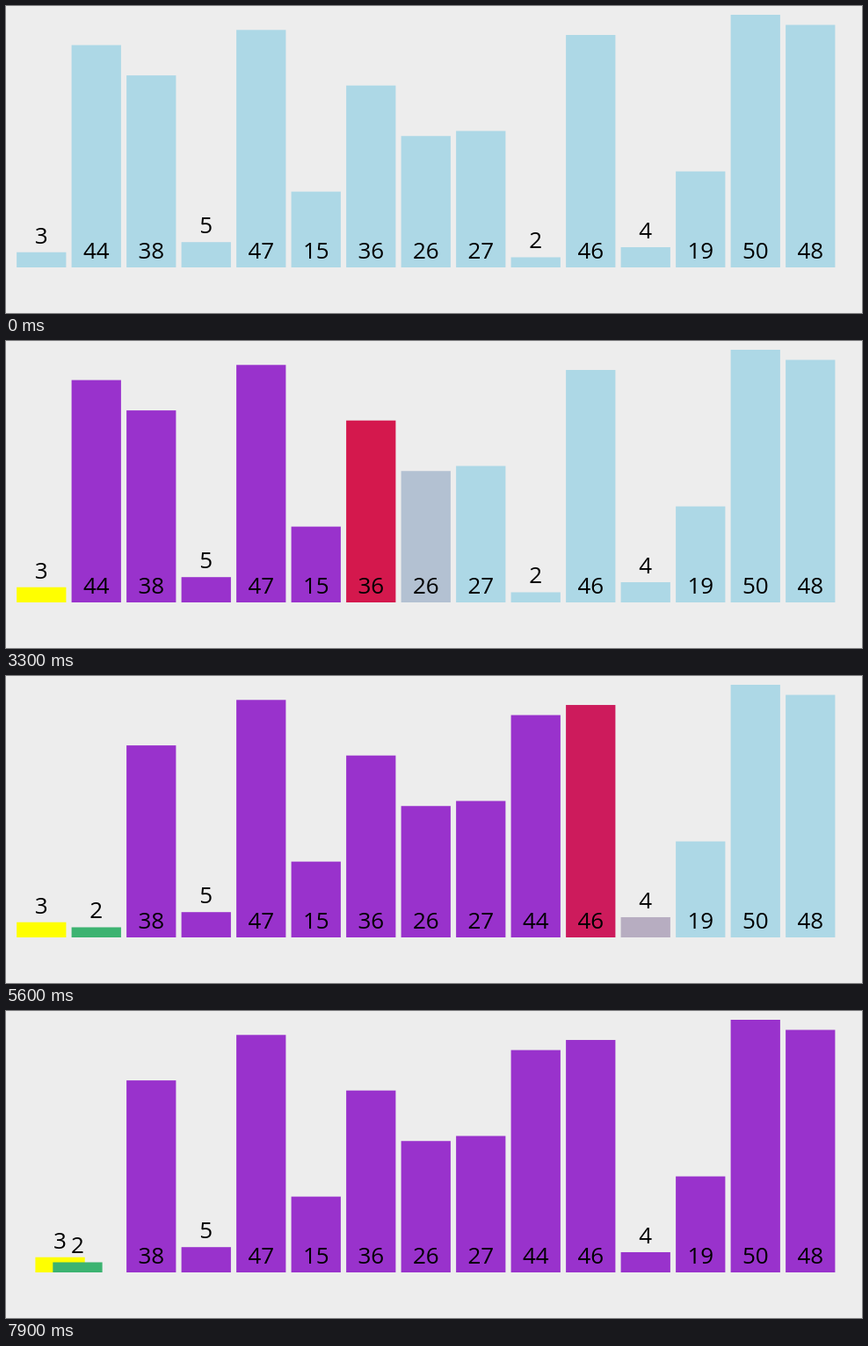
Animation, 974 px wide and 350 px high, one loop 8 s. Source, as an HTML page:

```html
<!DOCTYPE html>
<html lang="en">
<head>
<meta charset="utf-8">
<title>Quick sort</title>
<style>
  html, body { margin: 0; width: 100%; height: 100%; overflow: hidden; background: #ededed; }
  svg { display: block; width: 100%; height: 100%; }
  text { font: 26px "Open Sans", "Noto Sans", sans-serif; text-anchor: middle; }
</style>
</head>
<body>
<svg id="stage" viewBox="0 0 974 350"></svg>
<script>
const LOOP = 8000, TICK = 100, FADE = 200;
const LEFT = 12.1, PITCH = 62.5, WIDTH = 56.3, BASE = 298, UNIT = 5.76;
const BLUE = [173, 216, 230], RED = [220, 20, 60], PURPLE = [153, 50, 204];
const YELLOW = [255, 255, 0], GREEN = [60, 179, 113];

const values = [3, 44, 38, 5, 47, 15, 36, 26, 27, 2, 46, 4, 19, 50, 48];
const starts = [40, 500, 955, 1411, 1868, 2326, 2770, 3238, 3698,
                4155, 4610, 5069, 5524, 5970, 6410, 6898, 7400, 7812];

// Partition pass: bar 0 is the pivot, bar 9 is the only smaller value.
const steps = starts.map(start => ({ start, changes: [] }));
const paint = (step, bar, color) => steps[step].changes.push({ bar, color });
const move = (step, bar, slot) => steps[step].changes.push({ bar, slot });

paint(0, 0, YELLOW);
for (let bar = 1; bar < values.length; bar++) {
  const step = bar < 10 ? bar : bar + 1;
  paint(step, bar, RED);
  if (bar === 9) paint(11, bar, GREEN);
  else paint(step + 1, bar, PURPLE);
}
move(10, 1, 9);
move(10, 9, 1);
move(17, 0, 1);
move(17, 9, 0);

function add(parent, tag, attrs) {
  const node = document.createElementNS("http://www.w3.org/2000/svg", tag);
  for (const key in attrs) node.setAttribute(key, attrs[key]);
  return parent.appendChild(node);
}

const stage = document.getElementById("stage");
const bars = values.map(value => {
  const group = add(stage, "g", {});
  const top = BASE - value * UNIT;
  const rect = add(group, "rect", { y: top, width: WIDTH, height: value * UNIT });
  const label = add(group, "text", { x: WIDTH / 2, y: (value < 10 ? top : BASE) - 10 });
  label.textContent = value;
  return { group, rect };
});

const mix = (a, b, p) => a + (b - a) * p;
const ease = u => u < 0.5 ? 4 * u ** 3 : 1 - 4 * (1 - u) ** 3;

function draw(time) {
  const state = values.map((_, slot) => ({ slot, color: BLUE }));
  for (const { start, changes } of steps) {
    if (time <= start) break;
    const p = ease(Math.min(1, (time - start) / FADE));
    for (const { bar, color, slot } of changes) {
      const s = state[bar];
      if (color) s.color = s.color.map((c, i) => mix(c, color[i], p));
      else s.slot = mix(s.slot, slot, p);
    }
  }
  state.forEach(({ slot, color }, i) => {
    bars[i].group.setAttribute("transform", `translate(${LEFT + PITCH * slot} 0)`);
    bars[i].rect.setAttribute("fill", `rgb(${color.map(Math.round)})`);
  });
}

const origin = performance.now();
function frame() {
  const time = (performance.now() - origin) % LOOP;
  draw(Math.floor(time / TICK) * TICK); // motion runs at ten pictures a second
  requestAnimationFrame(frame);
}
frame();
</script>
</body>
</html>
```
